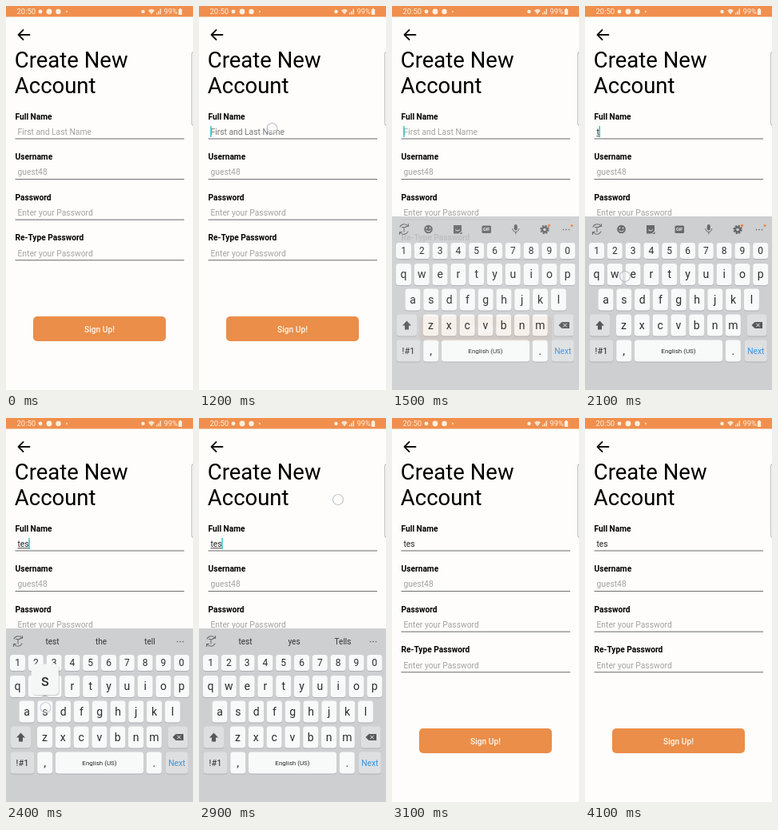
Animation of 234 by 480 pixels, one loop 4.2 s. Source, as an HTML page:

```html
<!DOCTYPE html>
<html lang="en">
<head>
<meta charset="utf-8">
<title>Create account</title>
<style>
html, body { margin: 0; width: 100%; height: 100%; overflow: hidden; background: #fefdfb; }
svg { display: block; width: 100vw; height: 100vh; font-family: Roboto, sans-serif; }
.title { font-size: 27.5px; }
.label { font-size: 10.2px; font-weight: 700; }
.field { font-size: 10.3px; fill: #a2a2a2; }
.mid { text-anchor: middle; }
.line { fill: none; stroke-linecap: round; stroke-linejoin: round; }
</style>
</head>
<body>
<svg id="stage" viewBox="0 0 234 480">
  <rect width="234" height="480" fill="#fefdfb"/>
  <g id="status" fill="#fff0df">
    <rect width="234" height="13.5" fill="#f08f4e"/>
    <text x="13.5" y="10.3" font-size="9.5">20:50</text>
    <circle cx="43" cy="7" r="2.4"/>
    <circle cx="54" cy="7" r="3.4"/>
    <circle cx="65.5" cy="7" r="3.2"/>
    <circle cx="76" cy="7" r=".9"/>
    <circle cx="171.5" cy="7" r="2.2"/>
    <path d="M178 5.5Q182 2 186 5.5L182 10.5Z" opacity=".85"/>
    <path d="M188 10.5V8.5h1.3v2zM190.3 10.5V6.5h1.3v4zM192.600 10.500V3.500h1.300v7z"/>
    <text x="197.500" y="10.300" font-size="9.300">99%</text>
    <path d="M217 3h2v1h1.200v7h-4.400V4h1.200z"/>
  </g>
  <path class="line" d="M29.500 36H15.500M21.500 30L15.500 36L21.500 42" stroke="#111" stroke-width="1.800"/>
  <text class="title" x="10.800" y="77">Create New</text>
  <text class="title" x="10.800" y="109">Account</text>
  <path class="line" d="M235 57.500Q232.500 57.500 232.500 61V146Q232.500 149.500 235 149.500" stroke="#c2c2c4" stroke-width="1.200"/>
  <g id="form"></g>
  <rect x="34" y="388" width="166" height="31" rx="5" fill="#ea8e49"/>
  <text class="mid" x="117" y="407.700" font-size="10.200" font-weight="500" fill="#fff8ee">Sign Up!</text>
  <rect id="composing" x="14.500" y="162.300" height=".9" fill="#333"/>
  <rect id="caret" y="150" width="1.400" height="14" fill="#20c7c1"/>
  <g id="keyboard">
    <rect y="263" width="234" height="240" fill="#cecfd0"/>
    <g class="line" stroke="#6b6d70" stroke-width="1.100">
      <path d="M10 276A6 6 0 0 1 20 275M20.500 272.500V275.500H17.500M20 282A6 6 0 0 1 10 283M9.500 285.500V282.500H12.500M12.500 276.500H17.500M15 276.500V282"/>
    </g>
    <g id="tools" fill="#66686b">
      <circle cx="45.500" cy="279" r="5.300"/>
      <circle cx="43.500" cy="277.500" r=".9" fill="#e4e4e5"/>
      <circle cx="47.500" cy="277.500" r=".9" fill="#e4e4e5"/>
      <path class="line" d="M42.700 280.500Q45.500 283.500 48.300 280.500" stroke="#e4e4e5"/>
      <path d="M77 274H87V281L83.500 284.500H77ZM84.500 285L87.500 282V285Z"/>
      <path class="line" d="M79.500 280Q82 282.500 84.500 280" stroke="#e4e4e5"/>
      <rect x="112.500" y="274.500" width="11.500" height="9.500" rx="1.500"/>
      <text class="mid" x="118.200" y="281.300" font-size="5.400" font-weight="700" fill="#eee">GIF</text>
      <rect x="152.800" y="273" width="4" height="7.500" rx="2"/>
      <path class="line" d="M150.800 278.500A4 4 0 0 0 158.800 278.500M154.800 282.500V285" stroke="#66686b"/>
      <circle cx="191" cy="279.500" r="4.700" fill="none" stroke="#66686b" stroke-width="2" stroke-dasharray="2.200 1.490"/>
      <circle cx="191" cy="279.500" r="3" fill="none" stroke="#66686b" stroke-width="2.400"/>
      <circle cx="196.500" cy="274.500" r="1.700" fill="#ef8540"/>
      <circle cx="225" cy="274.500" r="1.500" fill="#ef8540"/>
    </g>
    <path class="line" d="M214.500 279.500h0M218 279.500h0M221.500 279.500h0" stroke="#66686b" stroke-width="1.700"/>
    <g id="hints"></g>
    <g id="keys"></g>
    <path d="M18.500 393.500L24 399.500H21V404.500H16V399.500H13Z" fill="#55575a"/>
    <path d="M208.500 399L212.500 395H222V403H212.500Z" fill="#55575a"/>
    <path class="line" d="M214.500 397L218.500 401M218.500 397L214.500 401" stroke="#eee"/>
  </g>
  <g id="popup">
    <rect x="-16" y="-18.500" width="34" height="39" rx="5" fill="#000" opacity=".13"/>
    <rect x="-17" y="-19.500" width="34" height="38.500" rx="5" fill="#f5f6f6"/>
    <text class="mid" y="8" font-size="20" fill="#222"></text>
  </g>
  <circle id="touch" r="6.500" fill="#fff" fill-opacity=".45" stroke="#b3b7c6" stroke-width="1.200"/>
</svg>
<script>
const LOOP = 4200, STEP = 100;
const $ = id => document.getElementById(id);

function add(parent, tag, attrs, text = "") {
  const el = document.createElementNS("http://www.w3.org/2000/svg", tag);
  set(el, attrs);
  el.textContent = text;
  parent.append(el);
  return el;
}
function set(el, attrs) {
  for (const name in attrs) el.setAttribute(name, attrs[name]);
}

const fields = [
  ["Full Name", "First and Last Name"],
  ["Username", "guest48"],
  ["Password", "Enter your Password"],
  ["Re-Type Password", "Enter your Password"]
].map(([label, hint], i) => {
  const y = i * 50.6;
  add($("form"), "text", { class: "label", x: 11.5, y: 141.5 + y }, label);
  add($("form"), "rect", { x: 11.5, y: 165.4 + y, width: 211.5, height: 1.1, fill: "#77777b" });
  return add($("form"), "text", { class: "field", x: 14.5, y: 160.8 + y }, hint);
});

const keyAt = {};
function key(label, x, y, w, { h = 27, size = 14, fill = "#f8f9f9", color = "#2b2c2e" } = {}) {
  add($("keys"), "rect", { x: x - w / 2, y: y - h / 2 + 1, width: w, height: h, rx: 3.5, fill: "#aeb0b3" });
  add($("keys"), "rect", { x: x - w / 2, y: y - h / 2, width: w, height: h, rx: 3.5, fill });
  add($("keys"), "text", { class: "mid", x, y: y + size * .34, "font-size": size, fill: color }, label);
  keyAt[label] = [x, y];
}
function row(letters, x, y, style) {
  [...letters].forEach((c, i) => key(c, x + i * 22.8, y, 19, style));
}
const dark = { fill: "#dedfe1" };
row("1234567890", 14.5, 306, { h: 20, size: 12 });
row("qwertyuiop", 14.5, 335.5);
row("asdfghjkl", 26, 367);
row("zxcvbnm", 48.5, 399);
key("", 18.5, 399, 25, dark);
key("", 215, 399, 25, dark);
key("!#1", 20.5, 431, 30, { ...dark, size: 11 });
key(",", 48.7, 431, 19);
key("English (US)", 117, 431, 110, { size: 8 });
key(".", 185.3, 431, 19);
key("Next", 213.8, 431, 28, { ...dark, size: 10.3, color: "#3994df" });

const hints = [58, 119, 180].map(x =>
  add($("hints"), "text", { class: "mid", x, y: 283, "font-size": 10, fill: "#333" }));

// Each entry holds from its start time until the next one.
const at = (track, t) => track.filter(e => e[0] <= t).pop();
const typed = [[0, ""], [2000, "t"], [2200, "te"], [2400, "tes"]];
const popups = [[0, ""], [1900, "t"], [2100, ""], [2200, "e"], [2300, ""], [2400, "s"], [2500, ""]];
const suggestions = [[0], [2300, "test", "the", "tell"], [2500, "test", "yes", "Tells"]];
const boards = [[0, 0, 60], [1400, .7, 10], [1500, .93, 0], [1600, 1, 0], [3000, .7, 10], [3100, 0, 60]];
const touches = [
  [0, 0, 0, 0], [1200, 91.5, 153, .9], [1300, 91.5, 153, .4], [1400, 0, 0, 0],
  [1900, 104, 336, .9], [2000, 104, 336, .5], [2100, 50, 338, .85], [2200, 50, 338, .6],
  [2300, 49.5, 362, .7], [2400, 49.5, 362, .65], [2500, 49.5, 362, .3], [2600, 0, 0, 0],
  [2900, 174, 102, .8], [3000, 174, 102, .4], [3100, 0, 0, 0]
];

function render(t) {
  const text = at(typed, t)[1];
  const focused = t >= 1200 && t < 3000;
  fields[0].textContent = text || "First and Last Name";
  fields[0].style.fill = text ? "#222" : t >= 1200 && t < 1300 ? "#777" : "";
  const width = text ? fields[0].getComputedTextLength() : 0;
  set($("composing"), { width, opacity: focused ? 1 : 0 });
  const blinkOff = t >= 1700 && t < 2000;
  set($("caret"), { x: 14.2 + width, opacity: focused && !blinkOff ? 1 : 0 });

  const [, opacity, drop] = at(boards, t);
  set($("keyboard"), { opacity, transform: `translate(0 ${drop})` });
  const words = at(suggestions, t).slice(1);
  hints.forEach((el, i) => el.textContent = words[i] || "");
  set($("tools"), { opacity: words.length ? 0 : 1 });

  const letter = at(popups, t)[1];
  set($("popup"), { opacity: letter ? 1 : 0 });
  if (letter) {
    const [x, y] = keyAt[letter];
    set($("popup"), { transform: `translate(${x} ${y - 40})` });
    $("popup").lastElementChild.textContent = letter;
  }
  const [, cx, cy, alpha] = at(touches, t);
  set($("touch"), { cx, cy, opacity: alpha });
}

const start = performance.now();
function frame() {
  const t = (performance.now() - start) % LOOP;
  render(Math.floor(t / STEP) * STEP);
  requestAnimationFrame(frame);
}
frame();
</script>
</body>
</html>
```
